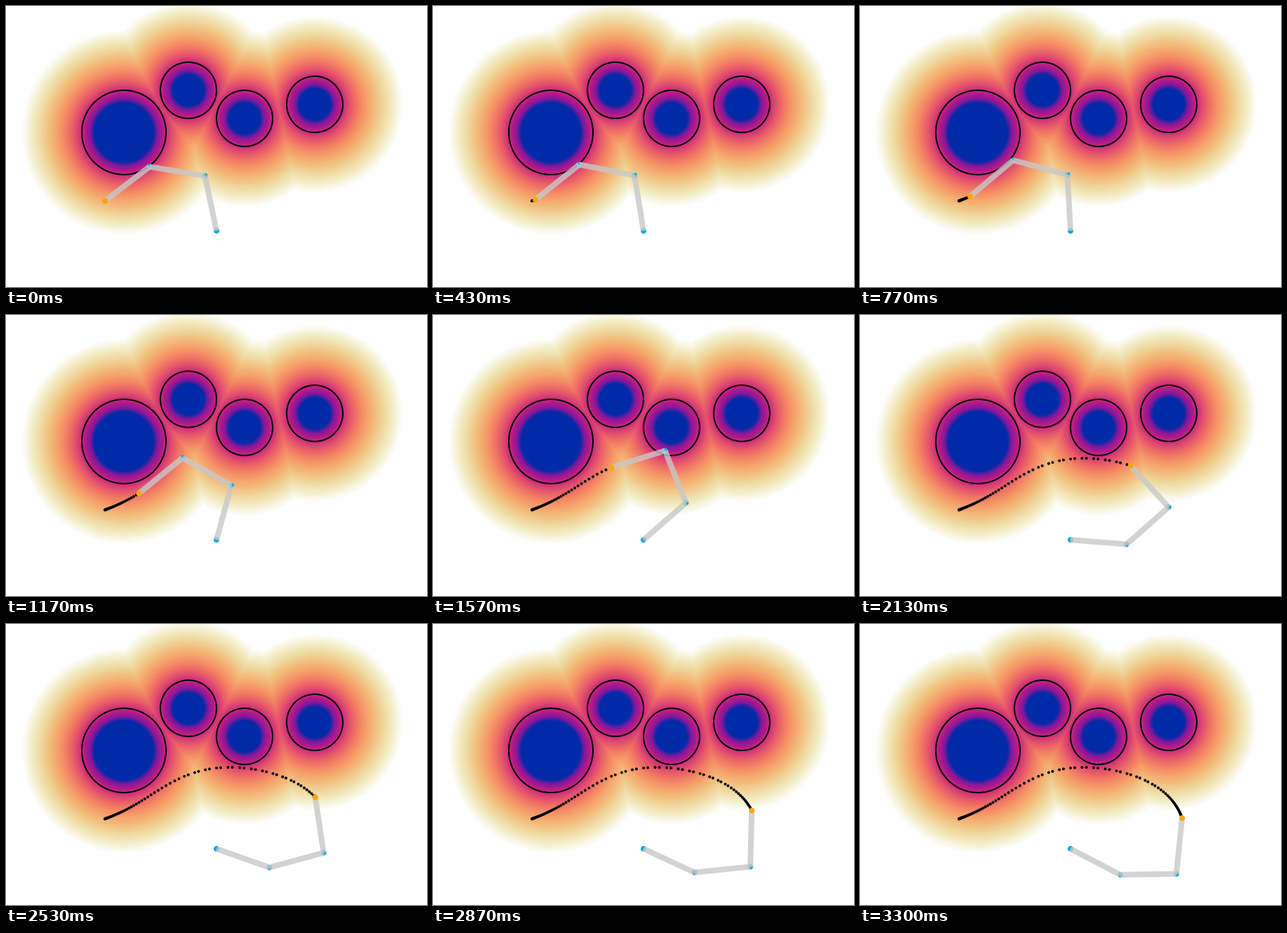
These frames come from a looping animation (600 px wide and 400 px high, 3.33 s). A matplotlib script:

```python
import numpy as np
import matplotlib.pyplot as plt
from matplotlib.animation import FuncAnimation
from matplotlib.colors import LinearSegmentedColormap

W, H, DPI = 600, 400, 100
PX = 72 / DPI  # points per pixel
LOOP, TICK = 3330, 10  # ms
STEPS = 100
LINK = 80
BASE = np.array([300.0, 320.0])
OBSTACLES = [(168, 180, 60), (260, 120, 40), (340, 160, 40), (440, 140, 40)]

# Key poses: step, hand x, hand y, angle of the first link
KEYS = np.array([
    (0, 141, 277.4, 101.9), (23, 157, 271, 93.2),
    (35, 189.5, 254, 74.7), (44, 234, 226.7, 50.7),
    (52, 291, 206.2, 25.2), (61, 364.5, 208.9, 1),
    (72, 428.8, 236, -15.8), (99, 459, 276.2, -27.5)])


def ease(step):
    """Logistic slow-in, slow-out."""
    return 1 / (1 + np.exp((48.5 - step) / 10))


def solve_arms():
    """Joint positions for every step, shape (steps, 4, 2)."""
    degree = len(KEYS) - 1
    coef = np.polyfit(ease(KEYS[:, 0]), KEYS[:, 1:], degree)

    # Short and long steps alternate in the fast part
    i = np.arange(STEPS)
    weight = np.clip(np.minimum(i - 44, 72 - i) / 4, 0, 1)
    t = i + 0.13 * weight * np.where(i % 2, 1, -1)
    pose = np.vander(ease(t), degree + 1) @ coef

    hand, a = pose[:, :2], np.radians(pose[:, 2])
    first = BASE + LINK * np.stack([np.cos(a), -np.sin(a)], axis=1)
    gap = hand - first
    dist = np.linalg.norm(gap, axis=1, keepdims=True)
    normal = np.stack([-gap[:, 1], gap[:, 0]], axis=1) / dist
    rise = np.sqrt(np.maximum(LINK ** 2 - dist ** 2 / 4, 0))
    second = (first + hand) / 2 + rise * normal
    base = np.broadcast_to(BASE, first.shape)
    return np.stack([base, first, second, hand], axis=1)


def heat_image(near=-18, far=86, decay=0.9):
    """Distance to the nearest obstacle, coloured with an exponential falloff."""
    heat = LinearSegmentedColormap.from_list("heat", [
        "#002aa8", "#85189a", "#b41a89", "#d03478", "#e4536c", "#ef7065",
        "#f58c66", "#f5a66e", "#f2bf7f", "#f0d89e", "#f3edc6", "#ffffff"], N=512)
    y, x = np.mgrid[0:H, 0:W] + 0.5
    d = np.min([np.hypot(x - cx, y - cy) - r for cx, cy, r in OBSTACLES], axis=0)
    s = np.clip((d - near) / (far - near), 0, 1)
    return heat((1 - np.exp(-decay * s)) / (1 - np.exp(-decay)), bytes=True)


arms = solve_arms()

fig = plt.figure(figsize=(W / DPI, H / DPI), dpi=DPI, facecolor="white")
ax = fig.add_axes([0, 0, 1, 1])
ax.imshow(heat_image(), extent=(0, W, H, 0), interpolation="nearest", aspect="auto")
ax.set_xlim(0, W)
ax.set_ylim(H, 0)
ax.axis("off")

for cx, cy, r in OBSTACLES:
    ax.add_patch(plt.Circle((cx, cy), r, fill=False, ec="black", lw=2 * PX, zorder=2))


def dots(color, size, z):
    return ax.scatter([], [], s=(size * PX) ** 2, color=color,
                      edgecolors="none", zorder=z)


trail = dots("black", 4, 3)
joints = dots("#00aadd", 8, 4)
links = [ax.plot([], [], color="#c8c8c8", alpha=0.8, lw=8 * PX,
                 solid_capstyle="butt", zorder=5)[0] for _ in range(3)]
tip = dots("orange", 8, 6)


def draw(tick):
    step = int((tick + 0.5) * STEPS * TICK / (LOOP + 3))
    pts = arms[step]
    trail.set_offsets(arms[:step + 1, 3])
    joints.set_offsets(pts[:3])
    for k, link in enumerate(links):
        link.set_data(pts[k:k + 2, 0], pts[k:k + 2, 1])
    tip.set_offsets(pts[3:])
    return [trail, joints, *links, tip]


anim = FuncAnimation(fig, draw, frames=LOOP // TICK, interval=TICK, repeat=True,
                     repeat_delay=0, blit=False)
plt.show()
```
